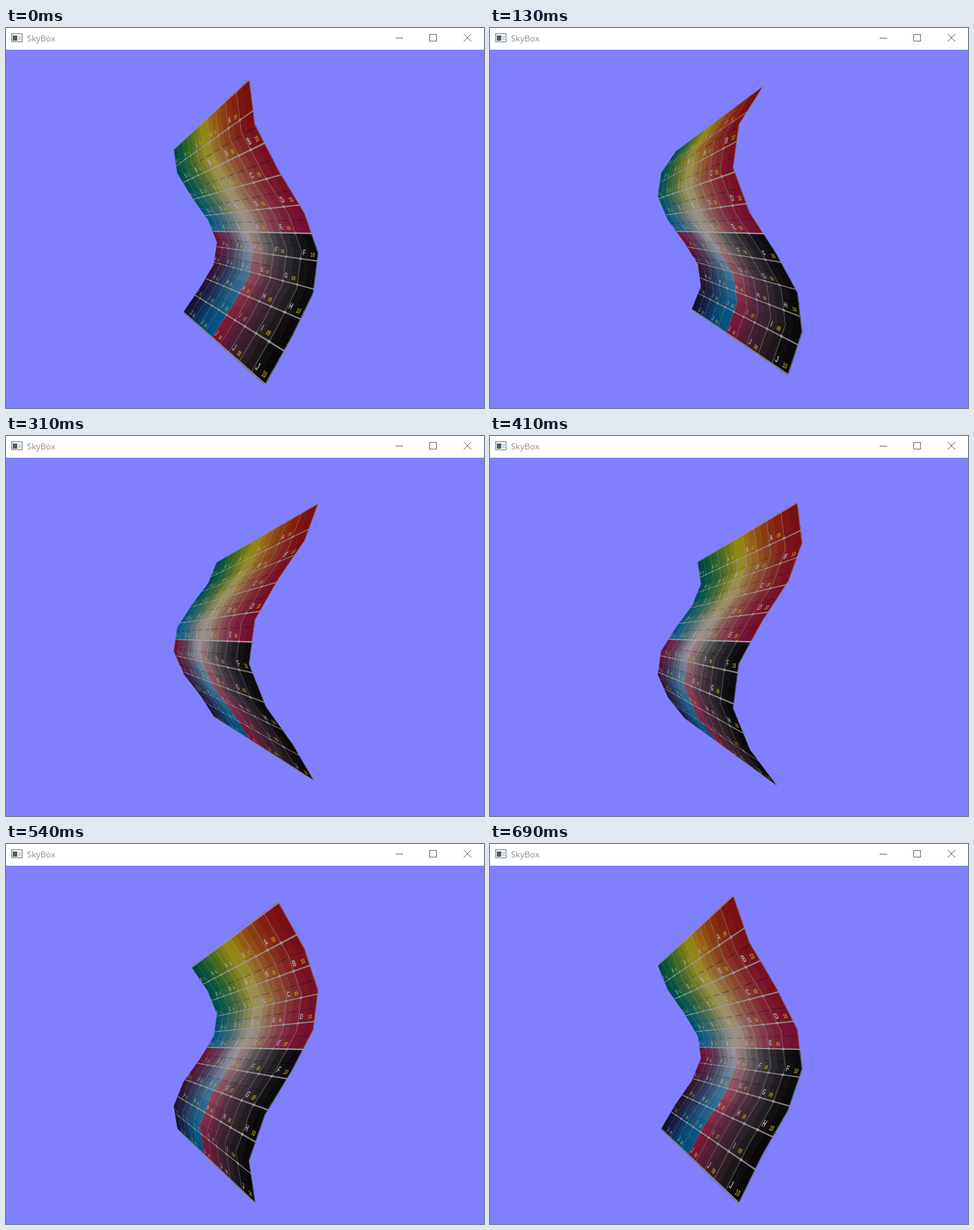
An HTML page with a canvas that plays this animation: 638x508 px, repeating every 740 ms.

```html
<!DOCTYPE html>
<html lang="en">
<head>
<meta charset="utf-8">
<title>SkyBox</title>
<style>
  html, body { margin: 0; width: 100%; height: 100%; overflow: hidden; background: #8080ff; }
  #stage { position: relative; width: 638px; height: 508px; overflow: hidden; }
  canvas, svg { position: absolute; left: 0; top: 0; display: block; }
</style>
</head>
<body>
<div id="stage">
  <canvas id="view" width="638" height="508"></canvas>
  <svg width="638" height="29" viewBox="0 0 638 29">
    <rect width="638" height="29" fill="#fff"/>
    <rect x="7.5" y="7.5" width="14" height="11" fill="#f4f4f4" stroke="#8a8a8a"/>
    <rect x="9" y="10" width="6" height="7" fill="#4c6070"/>
    <path d="M16 11.5h4M16 13.5h4M16 15.5h4" stroke="#b4bcc2"/>
    <text x="28" y="18" font-family="'Open Sans', 'Noto Sans', sans-serif" font-size="11.4" fill="#8f8f8f">SkyBox</text>
    <g fill="none" stroke="#777">
      <path d="M520 13.5h10"/>
      <rect x="565.5" y="8.5" width="9" height="9"/>
      <path d="M611 8l10 10M621 8l-10 10"/>
    </g>
  </svg>
</div>
<script>
const ctx = document.getElementById('view').getContext('2d');
const LOOP = 740;
const STARTS = [0, 50, 100, 130, 180, 230, 280, 310, 360, 410, 460, 490, 540, 590, 640, 690];
const BANDS = 7, CELLS = 10;
const FOCAL = 415, CX = 319, CY = 268;

// Colours of the chart: one line per key row, one entry per column
const KEY_ROWS = [0, 2, 4, 5, 7, 9];
const PALETTE = [
  '00463c 0a5537 286028 466c1e 7a7814 968c0f 966414 8c4112 872610 780f10',
  '00504b 0f5a4b 2d643c 506937 828237 a0965a 967346 8c5032 823030 781023',
  '0a5582 1e6487 3c6478 64787f 918c8c 9b918c 8c6964 824150 7d2341 730f2f',
  '6e1432 6e284b 5a3c55 6e6973 96919b 967d7d 5f5f5f 3e3c40 262428 0c0c0e',
  '2d162a 2d2341 2a3c64 2d5573 326e96 8c3c50 5f3246 412837 29242a 0b0a0b',
  '12122a 121e44 0a325f 054b73 005082 781432 551c37 381e2c 241c20 090809'
].map(line => line.split(' ').map(h => [0, 2, 4].map(i => parseInt(h.slice(i, i + 2), 16))));

const clamp = (x, lo, hi) => Math.min(hi, Math.max(lo, x));
const mix = (a, b, t) => a.map((x, i) => x + (b[i] - x) * t);

function rowColor(line, x) {
  const i = Math.min(8, Math.floor(x));
  return mix(line[i], line[i + 1], x - i);
}

// Colour of one quarter of a cell; hue breaks between rows E|F and columns 5|6
function shade(sx, sy) {
  const col = sx >> 1, row = sy >> 1, lower = row > 4;
  let x = clamp(col - 0.25 + 0.5 * (sx & 1), 0, 9);
  if (lower) x = col < 5 ? Math.min(x, 4) : Math.max(x, 5);
  let y = clamp(row - 0.25 + 0.5 * (sy & 1), 0, 9);
  y = lower ? Math.max(y, 5) : Math.min(y, 4);
  let k = 0;
  while (k < 4 && y > KEY_ROWS[k + 1]) k++;
  const t = (y - KEY_ROWS[k]) / (KEY_ROWS[k + 1] - KEY_ROWS[k]);
  const rgb = mix(rowColor(PALETTE[k], x), rowColor(PALETTE[k + 1], x), t);
  return `rgb(${rgb.map(Math.round)})`;
}

let phase = 0;
const wave = i => Math.sin(i * 0.79 + phase);

// Sheet position (u, v in 0..1) to screen
function project(u, v) {
  const i = clamp(Math.floor(v * BANDS + 1e-9), 0, BANDS - 1);
  const a = wave(i) + (wave(i + 1) - wave(i)) * (v * BANDS - i);
  const x = -0.614 + 0.8925 * u + 0.256 * a;
  const z = 3.897 - 1.775 * u + 0.1245 * a;
  const y = 2 * v - 1 + 0.0353;
  return [CX + FOCAL * x / z, CY + FOCAL * y / z];
}

// Filled patch of the sheet, following the folds on both sides
function patch(u0, v0, u1, v1, fill) {
  const vs = [v0];
  for (let i = 1; i < BANDS; i++) if (i / BANDS > v0 && i / BANDS < v1) vs.push(i / BANDS);
  vs.push(v1);
  const pts = vs.map(v => project(u0, v)).concat(vs.reverse().map(v => project(u1, v)));
  ctx.fillStyle = fill;
  ctx.beginPath();
  pts.forEach(p => ctx.lineTo(p[0], p[1]));
  ctx.fill();
}

function label(text, u, v, size, fill) {
  const d = 0.01, p = project(u, v), pu = project(u + d, v), pv = project(u, v + d);
  const k = size / 10;
  ctx.save();
  ctx.transform((pu[0] - p[0]) * k, (pu[1] - p[1]) * k, (pv[0] - p[0]) * k, (pv[1] - p[1]) * k, p[0], p[1]);
  ctx.font = "bold 100px 'Liberation Sans', Arial, sans-serif";
  ctx.textAlign = 'center';
  ctx.textBaseline = 'middle';
  ctx.fillStyle = fill;
  ctx.fillText(text, 0, 0);
  ctx.restore();
}

function drawCells() {
  const n = CELLS * 2;
  for (let i = 0; i < n; i++) {
    for (let j = 0; j < n; j++) {
      patch(i / n, j / n, Math.min(1, (i + 1) / n + 0.006), Math.min(1, (j + 1) / n + 0.004), shade(i, j));
    }
  }
  for (let c = 0; c < CELLS; c++) {
    for (let r = 1; r < 7; r++) {
      const v = (r + 0.5) / CELLS;
      patch((c + 0.2) / CELLS, v, (c + 0.85) / CELLS, v + 0.002, 'rgba(10,8,20,.5)');
    }
  }
}

function drawGrid() {
  const h = 0.0022;
  for (let i = 0; i <= CELLS; i++) {
    const t = clamp(i / CELLS, h, 1 - h);
    if (i) patch(t - h, 0, t + h, 1, 'rgba(165,165,165,.5)');
    patch(0, t - h, 1, t + h, i === 5 ? '#a8a8a8' : 'rgba(155,155,155,.85)');
  }
  for (let i = 1; i < CELLS; i++) {
    for (let j = 1; j < CELLS; j++) {
      const u = i / CELLS, v = j / CELLS;
      patch(u - 0.008, v - 0.004, u + 0.008, v + 0.004, '#969696');
    }
  }
}

function drawLabels() {
  for (let c = 0; c < CELLS; c++) {
    for (let r = c % 2; r < CELLS; r += 2) {
      const u = c / CELLS, v = r / CELLS;
      label('ABCDEFGHIJ'[r], u + 0.017, v + 0.077, 0.3, '#b4b4b4');
      label(String(c + 1).padStart(2, '0'), u + 0.069, v + 0.081, 0.22, '#b4aa1e');
    }
  }
}

let last = -1;
function render(ms) {
  const t = ms % LOOP;
  let step = STARTS.length - 1;
  while (STARTS[step] > t) step--;
  if (step !== last) {
    last = step;
    phase = 4.505 - step * Math.PI / 8;
    ctx.fillStyle = '#8080ff';
    ctx.fillRect(0, 0, 638, 508);
    drawCells();
    drawGrid();
    drawLabels();
  }
}

const begin = performance.now();
function tick() {
  render(Math.max(0, performance.now() - begin));
  requestAnimationFrame(tick);
}
tick();
</script>
</body>
</html>
```
